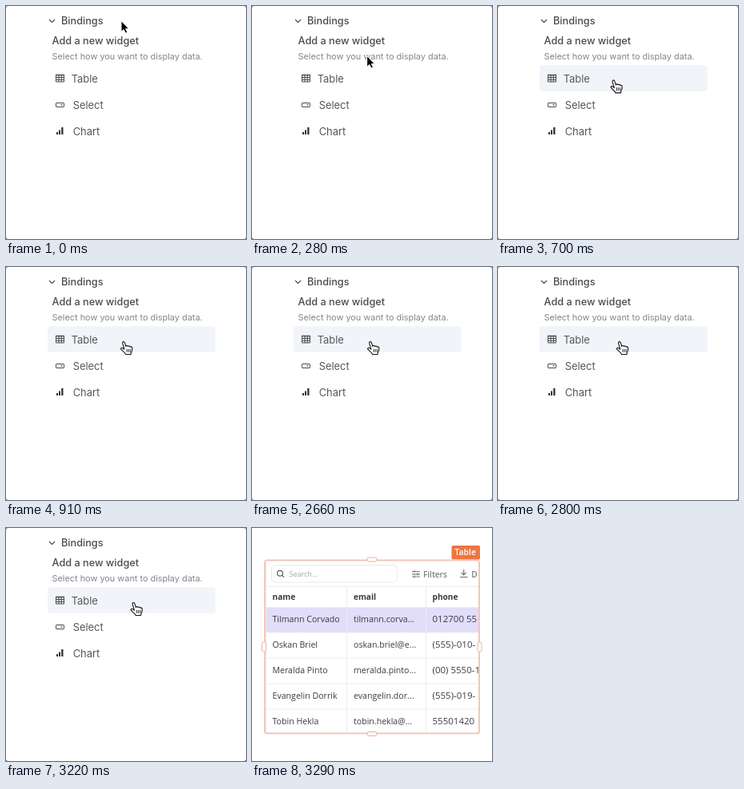
These frames come from a looping animation (300x292 px, 3320 ms). An HTML page:

```html
<!DOCTYPE html>
<html lang="en">
<head>
<meta charset="utf-8">
<title>Add a new widget</title>
<style>
  html, body { margin: 0; height: 100%; overflow: hidden; background: #fff; }
  svg { display: block; width: 100vw; height: 100vh; }
  #menu text { font: 12.9px Inter, sans-serif; fill: #575759; }
  #menu .title { font-weight: 500; font-size: 12.7px; fill: #4b4b4f; }
  #menu .hint { font-size: 10.9px; fill: #85858a; }
  #table text { font: 500 10.6px "Open Sans", sans-serif; fill: #3b3b45; }
  #table .phone { font-size: 11.5px; }
  #table .head { font-weight: 700; font-size: 10.1px; fill: #3a3a45; }
  #table .tool { font-weight: 600; font-size: 10px; fill: #7d7d85; }
  #table .search { font-weight: 400; font-size: 9px; fill: #a3a3ae; }
  #table .tag { font-weight: 600; font-size: 10.4px; fill: #fff; }
  .line { fill: none; stroke: #4b4848; }
</style>
</head>
<body>
<svg viewBox="0 0 300 292">
  <defs>
    <clipPath id="inside"><rect x="17" y="41" width="266" height="215.5"/></clipPath>
  </defs>

  <g id="menu">
    <rect width="300" height="292" fill="#777"/>
    <rect width="300" height="292" rx="3" fill="#fff"/>
    <rect id="hover" x="52" y="74.3" width="209.7" height="32.5" rx="3" fill="#f1f5fa"/>
    <path class="line" stroke-width="1.2" d="M54 17l3.5 3.5L61 17"/>
    <text class="title" x="69" y="23">Bindings</text>
    <text class="title" x="57.5" y="48">Add a new widget</text>
    <text class="hint" x="57.5" y="66.7">Select how you want to display data.</text>

    <path class="line" d="M62.5 86.5h10v8.500h-10zM62.500 89.500h10M62.500 92.300h10M66 87v8M69.300 87v8"/>
    <path class="line" stroke-width="1.500" d="M62 86.500h11"/>
    <text x="81.7" y="95.500">Table</text>

    <rect class="line" x="62.5" y="121.5" width="10" height="5" rx=".6"/>
    <path fill="#4b4848" d="M68 123.2h3l-1.5 1.8z"/>
    <text x="83.7" y="128.500">Select</text>

    <path fill="#333" d="M63 158h2v3h-2zM66 155.5h2v5.5h-2zM69.200 152h2.300v9h-2.300z"/>
    <text x="83.7" y="161.500">Chart</text>

    <circle id="ring" cx="161" cy="92.5" r="31" fill="none" stroke="#000" stroke-opacity=".5" stroke-width="2"/>
    <path id="arrow" fill="#000" stroke="#fff" stroke-linejoin="round"
      d="M0 -.5V13.3L3.1 10.5L5.3 15L7.7 13.9L5.6 9.6H9.6Z"/>
    <g id="hand" stroke-linejoin="round" stroke-linecap="round">
      <path fill="#fff" stroke="#111" stroke-width="1.1"
        d="M.4 9.6L-1.800 2.200C-2.400 0 .2 -.8 .9 1.300L2.400 6C2.800 4.600 4.800 4.700 5.100 6.100C5.800 5 7.500 5.400 7.700 6.700C8.700 6 10.200 6.600 10.300 8.200C10.400 11 9.800 12.500 8.800 14L8.600 16H2C1.600 14 -2.400 11.200 -3.600 9.600C-4.600 8 -2.600 7.200 -1.400 8.200Z"/>
      <path fill="none" stroke="#111" stroke-width=".9" d="M3.600 9.700v3.200M5.700 9.700v3.200M7.800 9.700v3.200"/>
    </g>
  </g>

  <g id="table">
    <rect width="300" height="292" fill="#fff"/>
    <rect x="249.5" y="22" width="35.5" height="17.5" rx="1.5" fill="#ef7541"/>
    <text class="tag" x="253.5" y="34.3">Table</text>
    <rect x="16" y="40.4" width="268" height="217" rx="3" fill="#fff" stroke="#f6c0b0" stroke-width="1.8"/>
    <g id="grid" clip-path="url(#inside)">
      <rect x="17.5" y="41.5" width="266" height="214.5" fill="none" stroke="#eeeef1"/>
      <rect x="24.5" y="46.5" width="157" height="21.5" rx="5" fill="#fff" stroke="#eaeaee"/>
      <g fill="none" stroke="#5c5c66" stroke-width="1.2">
        <circle cx="35" cy="56.7" r="3.4"/>
        <path d="M37.5 59.2l2.5 2.5"/>
        <path stroke="#7d7d85" d="M200 54.5h10M200 57.8h10M200 61h10M203 53v3M207 56.3v3M203 59.5v3"/>
        <path stroke="#6c6c75" d="M264.7 52v6.5M261.7 55.8l3 3 3-3M260 61.5h9.5"/>
      </g>
      <text class="search" x="46.5" y="60.7">Search...</text>
      <text class="tool" x="214" y="61.5">Filters</text>
      <text class="tool" x="274.3" y="61.5">D</text>
      <rect x="18" y="99" width="266" height="32" fill="#e2ddf8"/>
      <path stroke="#ececf0" d="M18 73.5h266M18 99.5h266M18 131h266M18 163h266M18 195h266M18 227h266M118.5 73v184M217.5 73v184"/>
    </g>
    <g id="handles" fill="#fff" stroke="#f2ad98"></g>
  </g>
</svg>
<script>
const $ = id => document.getElementById(id);

function add(parent, tag, attrs, text = "") {
  const el = document.createElementNS("http://www.w3.org/2000/svg", tag);
  for (const key in attrs) el.setAttribute(key, attrs[key]);
  el.textContent = text;
  parent.append(el);
}

const columns = [25.5, 127, 225.5];
const rows = [
  ["name", "email", "phone"],
  ["Tilmann Corvado", "tilmann.corva...", "012700 55"],
  ["Oskan Briel", "oskan.briel@e...", "(555)-010-"],
  ["Meralda Pinto", "meralda.pinto...", "(00) 5550-1"],
  ["Evangelin Dorrik", "evangelin.dor...", "(555)-019-"],
  ["Tobin Hekla", "tobin.hekla@...", "55501420"]
];
rows.forEach((row, r) => row.forEach((cell, c) => add($("grid"), "text", {
  x: columns[c], y: r ? 86.3 + 32 * r : 90, class: r ? rows[0][c] : "head"
}, cell)));

for (const [x, y, w, h] of [[150, 39.5, 12, 5], [150, 258, 12, 5], [15, 149, 5, 12], [284.5, 149, 5, 12]])
  add($("handles"), "rect", { x: x - w / 2, y: y - h / 2, width: w, height: h, rx: 1.8 });

// Pointer hotspot: time, x, y
const path = [
  [0, 144, 19], [490, 143.5, 91.5], [560, 143.5, 92.5], [910, 147.5, 93.5],
  [2590, 147.5, 93.5], [2660, 148.5, 93.5], [3010, 159.5, 93.5], [3080, 160, 93.5]
];

function pointer(t) {
  const i = path.findIndex(p => p[0] > t);
  if (i < 0) return path[path.length - 1].slice(1);
  const a = path[i - 1], b = path[i];
  const u = (t - a[0]) / (b[0] - a[0]), k = u * u * (3 - 2 * u);
  return [1, 2].map(n => a[n] + (b[n] - a[n]) * k);
}

const show = (id, on) => $(id).style.display = on ? "" : "none";
const start = performance.now();

function draw() {
  const now = Math.max(0, performance.now() - start) % 3320;
  const t = Math.floor(now / 70) * 70;
  const [x, y] = pointer(t);
  const over = y > 74;
  show("table", t >= 3290);
  show("menu", t < 3290);
  show("hover", t >= 560);
  show("ring", t >= 3080 && t < 3220);
  show("arrow", !over);
  show("hand", over);
  $(over ? "hand" : "arrow").setAttribute("transform", `translate(${x} ${y})`);
  requestAnimationFrame(draw);
}
draw();
</script>
</body>
</html>
```
